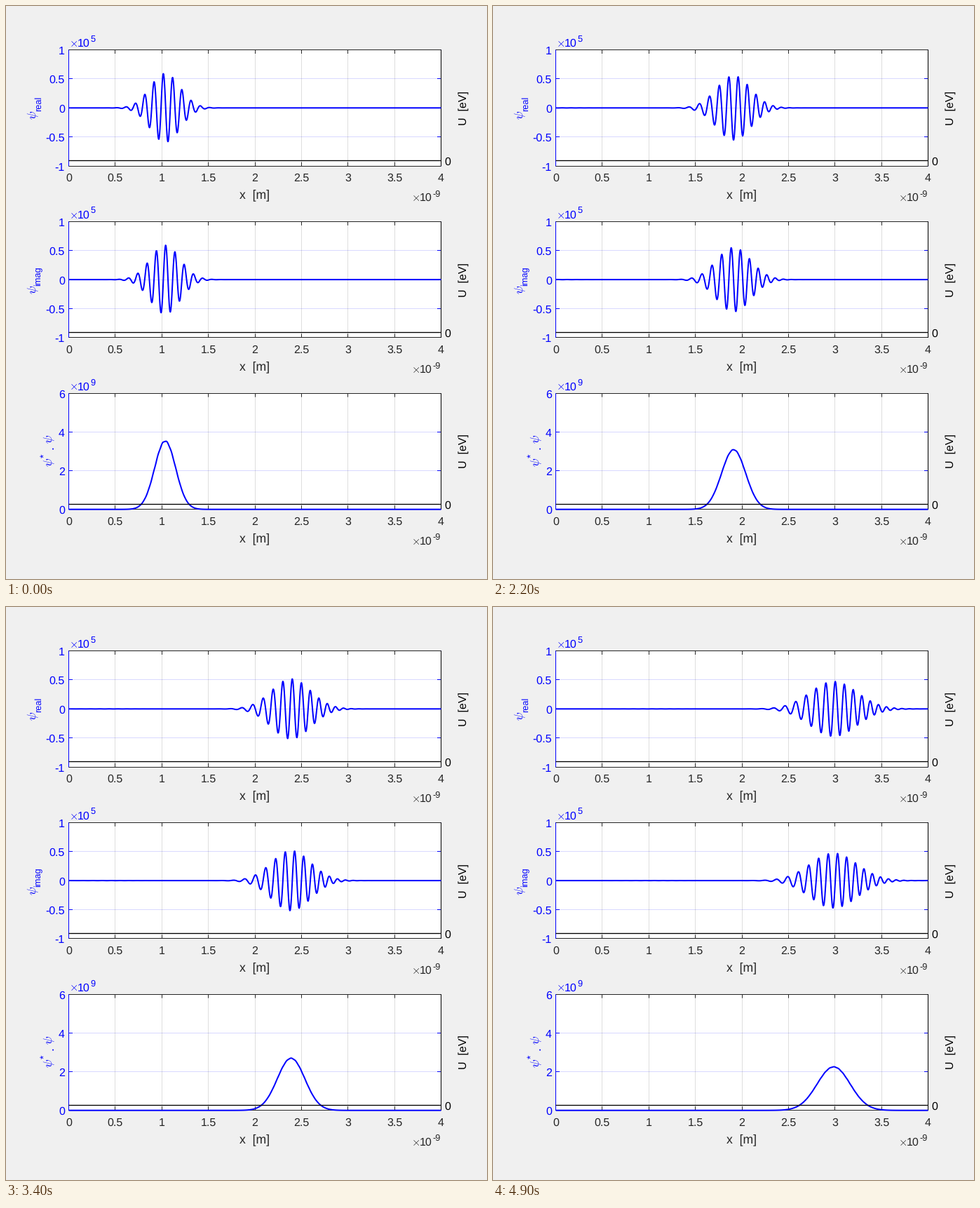
Recreate the animation shown at these times as a matplotlib script. Size 686x817 px, loop 5 s.

```python
import numpy as np
import matplotlib.pyplot as plt
from matplotlib.animation import FuncAnimation

WIDTH, HEIGHT, DPI = 686, 817, 100
PT = 72 / DPI  # points per pixel
FRAMES, INTERVAL, STEPS = 50, 100, 200
LEFT, RIGHT = 89.5, 620.5
TOPS, PLOT_H = (62.5, 307.3, 552.1), 165.6
BLUE, DARK, BLACK = "#0000ff", "#262626", "#000000"

plt.rcParams.update({"font.family": "Liberation Sans", "text.hinting": "none",
                     "path.simplify": False})


def simulate():
    """Free Schroedinger wave packet by finite differences; one entry per frame."""
    n, length, coupling = 1001, 4.0, 0.1
    x = np.linspace(0, length, n)
    offset = x - x[249]
    envelope = np.exp(-0.5 * (offset / (length / 25)) ** 2)
    re = envelope * np.cos(2 * np.pi * offset / (length / 40))
    im = envelope * np.sin(2 * np.pi * offset / (length / 40))
    norm = np.sqrt(np.sum(re**2 + im**2) * (x[1] - x[0]) * 1e-9)
    re, im = re / norm, im / norm
    history = []
    for _ in range(FRAMES):
        for _ in range(STEPS):
            re[1:-1] -= coupling * (im[2:] - 2 * im[1:-1] + im[:-2])
            im[1:-1] += coupling * (re[2:] - 2 * re[1:-1] + re[:-2])
        history.append((re.copy(), im.copy(), re**2 + im**2))
    return x, history


fig = plt.figure(figsize=(WIDTH / DPI, HEIGHT / DPI), dpi=DPI, facecolor="#f0f0f0")
stage = fig.add_axes([0, 0, 1, 1])
stage.set_xlim(0, WIDTH)
stage.set_ylim(HEIGHT, 0)
stage.axis("off")


def line(xs, ys, color, width=1.0, z=3, **kw):
    return stage.plot(xs, ys, color=color, lw=width * PT, zorder=z, snap=False,
                      solid_capstyle="butt", **kw)[0]


def crisp(value):
    """Centre of the pixel that holds a coordinate."""
    return np.floor(value) + 0.5


def hline(x0, x1, y, color, **kw):
    line([x0, x1], [crisp(y)] * 2, color, **kw)


def vline(x, y0, y1, color, **kw):
    line([crisp(x)] * 2, [y0, y1], color, **kw)


def text(x, y, s, color, size=16, ha="left", rotation=0):
    stage.text(x, y, s, color=color, fontsize=size * PT, ha=ha, va="baseline",
               rotation=rotation, rotation_mode="anchor", math_fontfamily="cm",
               zorder=6)


def to_x(nm):
    return LEFT + nm * (RIGHT - LEFT) / 4


def power(x, y, exponent, color):
    text(x - 1, y, r"$\times$", color)
    text(x + 11.5, y, "10", color)
    text(x + 29.8, y - 6.5, exponent, color, 12.8)


def panel(top, ticks, low, high, exponent):
    bottom = top + PLOT_H
    stage.add_patch(plt.Rectangle((LEFT, top), RIGHT - LEFT, PLOT_H, fc="white",
                                  zorder=1, snap=False))
    for value in np.arange(0, 4.1, 0.5):
        x = to_x(value)
        vline(x, top, bottom, DARK, z=2, alpha=0.15)
        vline(x, top, top + 5.5, DARK)
        vline(x, bottom, bottom - 5.5, DARK)
        text(x, bottom + 22.2, f"{value:g}", DARK, ha="center")
    for value in ticks:
        y = bottom - (value - low) / (high - low) * PLOT_H
        hline(LEFT, RIGHT, y, BLUE, z=2, alpha=0.15)
        hline(LEFT, LEFT + 5.5, y, BLUE)
        hline(RIGHT, RIGHT - 5.5, y, BLUE)
        text(83.8, y + 6.4, f"{value:g}", BLUE, ha="right")
    for y in (top, bottom):
        hline(LEFT, RIGHT, y, DARK)
    vline(LEFT, top, bottom, BLUE)
    vline(RIGHT, top, bottom, BLACK)
    hline(LEFT, RIGHT, bottom - 7.5, BLACK, width=1.33, z=5)
    power(90.5, top - 4.5, exponent, BLUE)
    power(578.5, bottom + 50, "-9", DARK)
    text(354.7, bottom + 46.4, "x  [m]", DARK, 17.6, "center")
    text(625.5, bottom - 0.9, "0", BLACK)
    text(656.2, top + PLOT_H / 2, "U  [eV]", BLACK, ha="center", rotation=90)


def psi_label(y, subscript):
    text(42, y, r"$\psi$", BLUE, 17.6, rotation=90)
    text(49.7, y - 11.7, subscript, BLUE, 12.8, rotation=90)


for top in TOPS[:2]:
    panel(top, (-1, -0.5, 0, 0.5, 1), -1, 1, "5")
panel(TOPS[2], (0, 2, 4, 6), 0, 6, "9")

psi_label(162, "real")
psi_label(410.5, "imag")
text(65, 657, r"$\psi$", BLUE, 17.6, rotation=90)
text(58.2, 644, "*", BLUE, 14, rotation=90)
text(67, 632, ".", BLUE, 17.6, rotation=90)
text(65, 624, r"$\psi$", BLUE, 17.6, rotation=90)

x, history = simulate()
px = to_x(x)
curves = [line(px, px * 0, BLUE, 2, z=4) for _ in TOPS]
BASES = (TOPS[0] + PLOT_H / 2, TOPS[1] + PLOT_H / 2, TOPS[2] + PLOT_H)
SCALES = (PLOT_H / 2e5, PLOT_H / 2e5, PLOT_H / 6e9)


def update(frame):
    for curve, values, base, scale in zip(curves, history[frame], BASES, SCALES):
        curve.set_ydata(base - values * scale)
    return curves


animation = FuncAnimation(fig, update, frames=FRAMES, interval=INTERVAL, repeat=True)
plt.show()
```
